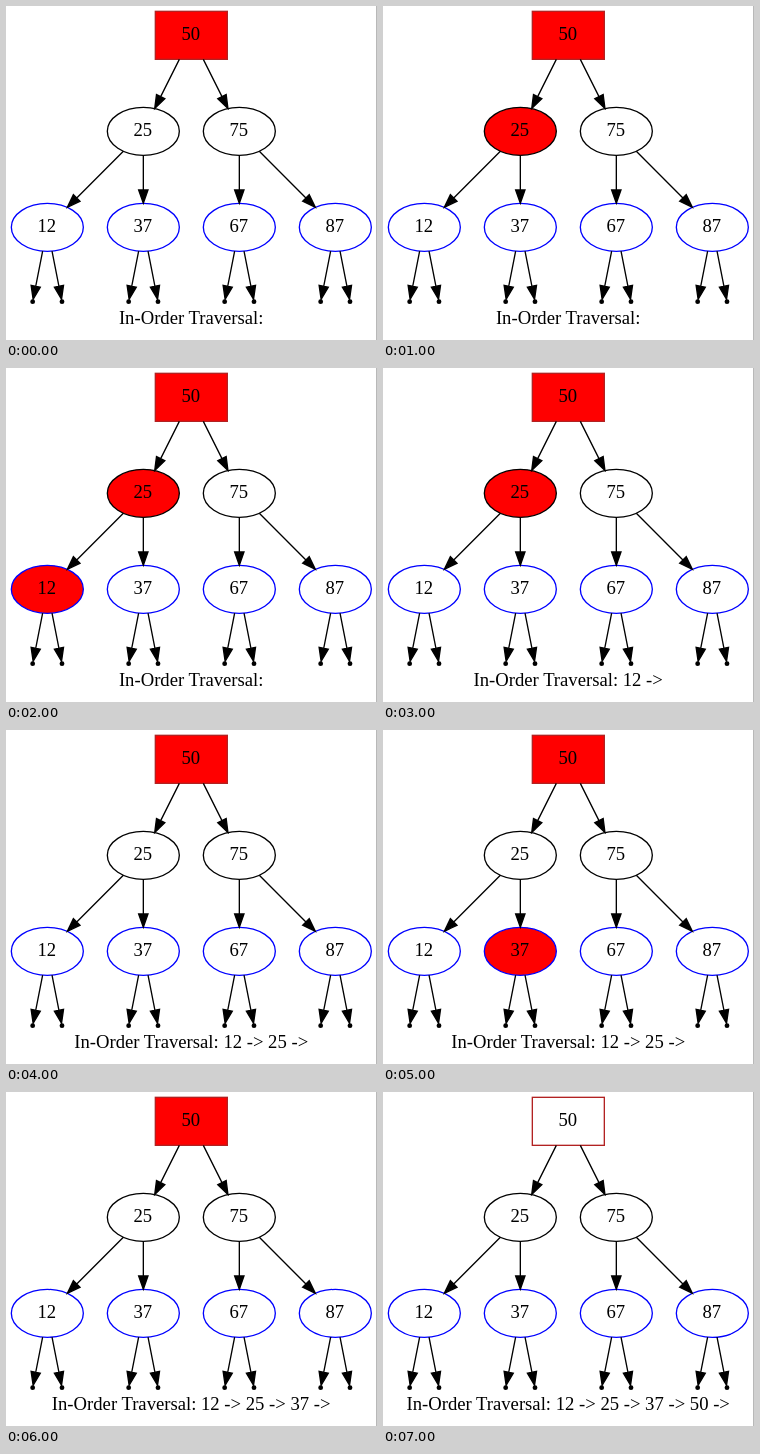
An HTML page for the animation above (8 s loop, 371x334 px).

```html
<!DOCTYPE html>
<html lang="en">
<head>
<meta charset="utf-8">
<title>In-Order Traversal</title>
<style>
html, body { margin: 0; width: 100%; height: 100%; overflow: hidden; background: #fff; }
svg { display: block; }
text { font: 18.667px "Liberation Serif", Times, serif; text-anchor: middle; }
</style>
</head>
<body>
<svg id="stage" width="371" height="334" viewBox="0 0 371 334"></svg>
<script>
const stage = document.getElementById('stage');
const STEP = 1000;
const RX = 36, RY = 24;

// Highlighted nodes and visited values at each step
const steps = [
  { red: [50], visited: [] },
  { red: [50, 25], visited: [] },
  { red: [50, 25, 12], visited: [] },
  { red: [50, 25], visited: [12] },
  { red: [50], visited: [12, 25] },
  { red: [50, 37], visited: [12, 25] },
  { red: [50], visited: [12, 25, 37] },
  { red: [], visited: [12, 25, 37, 50] }
];

function add(tag, attrs, content = '') {
  const el = document.createElementNS('http://www.w3.org/2000/svg', tag);
  for (const key in attrs) el.setAttribute(key, attrs[key]);
  el.textContent = content;
  return stage.appendChild(el);
}

const shapes = {};

function node(value, x, y, stroke, isRect) {
  const style = { fill: '#fff', stroke, 'stroke-width': 1.333 };
  shapes[value] = isRect
    ? add('rect', { x: x - RX, y: y - RY, width: 2 * RX, height: 2 * RY, ...style })
    : add('ellipse', { cx: x, cy: y, rx: RX, ry: RY, ...style });
  add('text', { x: x - 0.5, y: y + 4.7 }, value);
  return { x, y, rx: RX, ry: RY, isRect };
}

function dot(x, y) {
  add('circle', { cx: x, cy: y, r: 2.4 });
  return { x, y, rx: 2.4, ry: 2.4 };
}

// Point where the line from a to b leaves the outline of a
function border(a, b) {
  const dx = b.x - a.x, dy = b.y - a.y;
  const t = a.isRect ? a.ry / Math.abs(dy) : 1 / Math.hypot(dx / a.rx, dy / a.ry);
  return { x: a.x + dx * t, y: a.y + dy * t };
}

function edge(a, b) {
  const from = border(a, b), tip = border(b, a);
  const len = Math.hypot(tip.x - from.x, tip.y - from.y);
  const ux = (tip.x - from.x) / len, uy = (tip.y - from.y) / len;
  const bx = tip.x - ux * 13.33, by = tip.y - uy * 13.33;
  const wx = -uy * 4.67, wy = ux * 4.67;
  add('path', {
    d: `M${from.x} ${from.y}L${bx} ${by}M${bx + wx} ${by + wy}L${tip.x} ${tip.y}L${bx - wx} ${by - wy}Z`,
    stroke: '#000', 'stroke-width': 1.333
  });
}

add('rect', { x: 370, y: 0, width: 1, height: 334, fill: '#b8b8b8' });

const root = node(50, 185.33, 29.33, '#b22222', true);
const left = node(25, 137.33, 125.33, '#000');
const right = node(75, 233.33, 125.33, '#000');
edge(root, left);
edge(root, right);

[12, 37, 67, 87].forEach((value, i) => {
  const x = 41.33 + 96 * i;
  const leaf = node(value, x, 221.33, '#00f');
  edge(i < 2 ? left : right, leaf);
  edge(leaf, dot(x - 14.67, 295.7));
  edge(leaf, dot(x + 14.67, 295.7));
});

const caption = add('text', { x: 185.2, y: 318 });

function draw(now) {
  const { red, visited } = steps[Math.floor(now / STEP) % steps.length];
  for (const value in shapes) {
    shapes[value].setAttribute('fill', red.includes(+value) ? '#f00' : '#fff');
  }
  caption.textContent = 'In-Order Traversal:' + visited.map(v => ` ${v} ->`).join('');
}

function loop() {
  draw(performance.now());
  requestAnimationFrame(loop);
}
loop();
</script>
</body>
</html>
```
